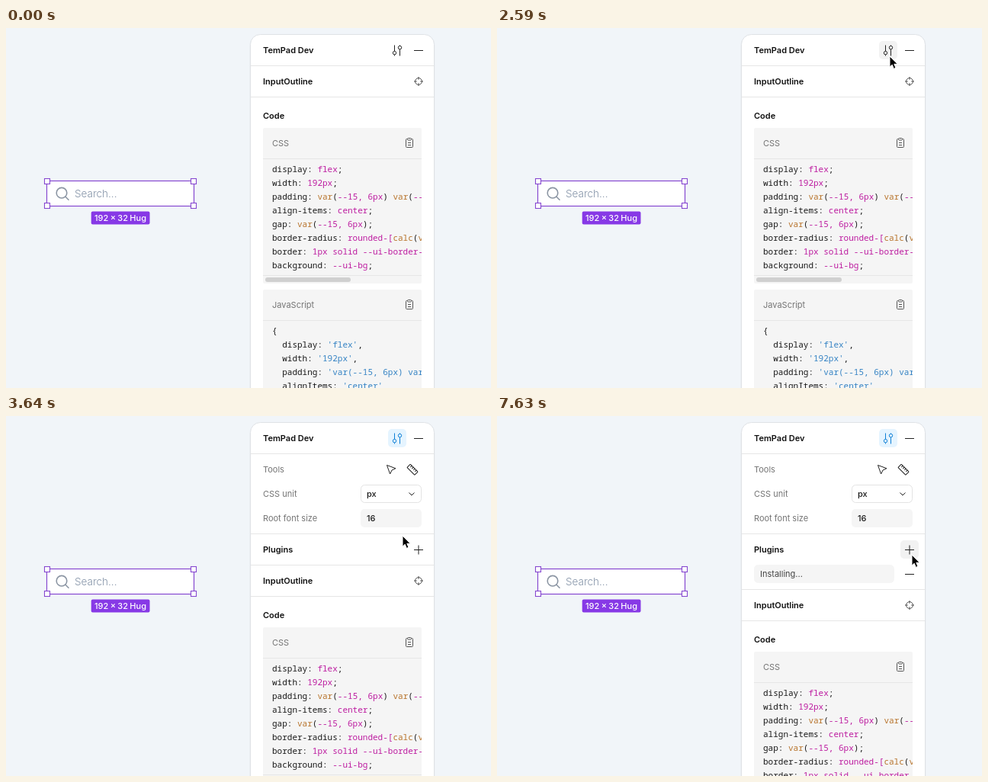
Write an HTML page that moves like this. It is 636 px wide and 472 px high and loops after 8 s.

```html
<!DOCTYPE html>
<html lang="en">
<head>
<meta charset="utf-8">
<style>
  html, body { margin: 0; width: 100%; height: 100%; overflow: hidden; background: #f1f5f9; }
  svg { display: block; }
  text { font: 11px Inter, sans-serif; fill: #1a1a1a; white-space: pre; }
  .bold { font-weight: 600; fill: #111; }
  .mid { font-weight: 500; }
  .dim { fill: #757575; }
  .code { font-family: "Noto Sans Mono", monospace; }
  .val { fill: #bd1ca0; }
  .fn { fill: #b8742c; }
  .str { fill: #3583c4; }
  .icon { fill: none; stroke: #222; }
  .soft { stroke: #555; }
  .rule { stroke: #e6e6e6; }
  .box { fill: #f5f5f5; }
</style>
</head>
<body>
<svg width="636" height="472" viewBox="0 0 636 472">
  <defs>
    <clipPath id="codeClip"><rect x="337" y="120" width="208" height="500"/></clipPath>
    <clipPath id="foldClip"><rect id="fold" x="321" y="50" width="240" height="0"/></clipPath>
    <g id="clipboard" class="icon soft">
      <path d="M526.5 145.5h-1a1 1 0 0 0-1 1v9a1 1 0 0 0 1 1h7a1 1 0 0 0 1-1v-9a1 1 0 0 0-1-1h-1M527 150.5h4M527 153.5h4"/>
      <rect x="526.5" y="144.5" width="5" height="2.5" rx="1"/>
    </g>
  </defs>

  <rect x="53.5" y="200.5" width="193" height="33" fill="#fff" stroke="#8648d0" stroke-width="1.2"/>
  <g id="handles" fill="#fff" stroke="#8648d0" stroke-width="1.1"></g>
  <g fill="none" stroke="#8b95a3" stroke-width="1.6" stroke-linecap="round">
    <circle cx="73" cy="216.2" r="6.8"/><path d="M78 221.2l4 4"/>
  </g>
  <text x="90" y="222" style="font-size:13.5px;font-weight:300;fill:#8594a8">Search...</text>
  <rect x="111.7" y="240.4" width="76.8" height="17.2" rx="2" fill="#8739e6"/>
  <text x="150" y="253" text-anchor="middle" class="mid" style="fill:#fff;word-spacing:-.6px">192 × 32 Hug</text>

  <rect x="319.5" y="9" width="243" height="500" rx="14" fill="#000" opacity=".03"/>
  <rect x="320.5" y="8.5" width="241" height="500" rx="13" fill="#fff" stroke="#dfe2e6"/>
  <text x="337" y="33" class="bold">TemPad Dev</text>
  <rect id="prefBg" x="501" y="17" width="24" height="24" rx="5"/>
  <g id="pref" class="icon">
    <path d="M509.5 22.5v8M509.5 35v1.5M516.5 22.5v1M516.5 28v8.5"/>
    <circle cx="509.5" cy="32.7" r="2.2"/><circle cx="516.5" cy="25.7" r="2.2"/>
  </g>
  <path class="icon" d="M535 29.5h12"/>
  <path class="rule" d="M321 49.5h240"/>

  <g clip-path="url(#foldClip)">
    <g id="prefs">
      <text x="337" y="74" class="dim">Tools</text>
      <path class="icon" stroke-linejoin="round" d="M499.5 64.5l11.5 4.2-5 2.3-2.4 5z"/>
      <g class="icon" transform="translate(533 70.3) rotate(45)">
        <rect x="-7" y="-3" width="14" height="6" rx=".6"/>
        <path d="M-4.2-3v2.6M-1.4-3v2.6M1.4-3v2.6M4.2-3v2.6"/>
      </g>
      <text x="337" y="106" class="dim">CSS unit</text>
      <rect x="465.5" y="90.5" width="79" height="23" rx="5" fill="#fff" stroke="#e3e3e3"/>
      <text x="473" y="106" class="mid">px</text>
      <path class="icon" d="M528.5 100.5l3.5 3.5 3.5-3.5"/>
      <text x="337" y="138" class="dim">Root font size</text>
      <rect x="465" y="122" width="80" height="24" rx="5" class="box"/>
      <text x="473" y="138" class="mid">16</text>
      <path class="rule" d="M321 154.5h240"/>
      <text x="337" y="179" class="bold">Plugins</text>
      <rect id="addBg" x="529" y="163" width="24" height="24" rx="5" fill="#f2f2f2"/>
      <path class="icon" d="M535 175.5h12M541 169.5v12"/>
      <g id="plugin">
        <rect id="field" x="337.5" y="195.5" width="183" height="23" rx="5" class="box"/>
        <text id="entry" x="345" y="211"></text>
        <path id="caret" class="icon" d="M0 201v13"/>
        <path class="icon" d="M535 207.5h12"/>
      </g>
    </g>
    <path id="foldRule" class="rule" d="M321 49.5h240"/>
  </g>

  <g id="body">
    <text x="337" y="74" class="bold">InputOutline</text>
    <g class="icon soft">
      <circle cx="541" cy="70" r="4.4"/>
      <path d="M541 64v3.8M541 72.2V76M535 70h3.8M543.2 70h3.8"/>
    </g>
    <path class="rule" d="M321 90.5h240"/>
    <text x="337" y="119" class="bold">Code</text>
    <g clip-path="url(#codeClip)">
      <rect x="337" y="131" width="208" height="204" rx="2" class="box"/>
      <text x="349" y="155" class="dim">CSS</text>
      <use href="#clipboard"/>
      <path class="rule" d="M337 171.5h208M337 324.5h208"/>
      <g id="css"></g>
      <rect x="340" y="327" width="112" height="6" rx="3" fill="#d0d0d0"/>
      <rect x="337" y="343" width="208" height="200" rx="2" class="box"/>
      <text x="349" y="367" class="dim">JavaScript</text>
      <use href="#clipboard" y="212"/>
      <path class="rule" d="M337 383.5h208"/>
      <g id="js"></g>
    </g>
  </g>

  <path id="cursor" d="M0 0V14.2L3.2 11.2 5.4 16.4 8 15.3 5.8 10.3H10.2Z" stroke="#fff" stroke-linejoin="round"/>
</svg>
<script>
const $ = id => document.getElementById(id);
const show = (id, on) => $(id).setAttribute('visibility', on ? 'visible' : 'hidden');
const move = (id, x, y) => $(id).setAttribute('transform', `translate(${x} ${y})`);
const span = (cls, s) => `<tspan class="${cls}">${s}</tspan>`;

const css = `display: flex
width: 192px
padding: var(--15, 6px) var(--25, 10px)
align-items: center
gap: var(--15, 6px)
border-radius: rounded-[calc(var(--ui-radius)*1.5)]
border: 1px solid --ui-border-accented
background: --ui-bg`;
const js = `{
  display: 'flex',
  width: '192px',
  padding: 'var(--15, 6px) var(--25, 10px)',
  alignItems: 'center',`;

function cssLine(line) {
  const [prop, value] = line.split(': ');
  const parts = value.split(/(var|calc|[()])/).map(s =>
    /^(var|calc)$/.test(s) ? span('fn', s) : /^[()]$/.test(s) ? s : span('val', s));
  return `${prop}: ${parts.join('')};`;
}
const jsLine = line => line.replace(/'.*'/, s => span('str', s));
const list = (src, y, paint) => src.split('\n').map((line, i) =>
  `<text class="code" x="349" y="${y + 18 * i}">${paint(line)}</text>`).join('');

$('css').innerHTML = list(css, 189, cssLine);
$('js').innerHTML = list(js, 401, jsLine);
$('handles').innerHTML = [54, 246].flatMap(x => [201, 233].map(y =>
  `<rect x="${x - 3.5}" y="${y - 3.5}" width="7" height="7"/>`)).join('');

// time, x, y of the pointer tip
const path = [
  [1400, 608, 234], [1470, 585, 170], [1540, 556, 95], [1610, 537, 62], [1680, 530, 54],
  [1750, 530, 54], [1890, 522, 51], [2100, 522, 51], [2450, 515, 37], [3150, 515, 37],
  [3640, 520, 157], [3850, 543, 184], [3990, 544, 180], [7000, 544, 180], [7001, 544, 182], [8000, 544, 182]
];
const smooth = p => p * p * (3 - 2 * p);
const clamp = p => Math.max(0, Math.min(1, p));

function pointer(t) {
  const i = Math.max(1, path.findIndex(k => k[0] >= t));
  const [t0, x0, y0] = path[i - 1], [t1, x1, y1] = path[i];
  const p = smooth(clamp((t - t0) / (t1 - t0)));
  return [x0 + (x1 - x0) * p, y0 + (y1 - y0) * p];
}

const OPEN = 2693, OPEN_TIME = 177, ADD = 4060, ENTER = 6580;
const keys = [4760, 5180, 5390, 5740, 6090];

function draw(t) {
  const [x, y] = pointer(t);
  const inside = (l, top) => t >= 1400 && x >= l && x <= l + 24 && y >= top && y <= top + 24;
  move('cursor', x, y);
  show('cursor', t >= 1400 && (t < keys[0] || t >= 7560));

  const open = smooth(clamp((t - OPEN) / OPEN_TIME));
  const active = t >= OPEN, added = t >= ADD;
  const shift = added ? 178 : Math.round(146 * open);
  $('fold').setAttribute('height', shift);
  move('foldRule', 0, shift);
  move('body', 0, shift);
  move('prefs', 0, -8 * (1 - open));

  $('pref').style.stroke = active ? '#0d7fd6' : '#222';
  $('prefBg').style.fill = active ? (open < 0.5 ? '#f2f9fd' : '#e5f4ff')
    : inside(501, 17) ? '#f2f2f2' : 'none';
  show('addBg', inside(529, 163));

  const typing = added && t < ENTER;
  show('plugin', added);
  $('field').style.stroke = typing ? '#2f8fdd' : '#f5f5f5';
  const typed = '@nuxt'.slice(0, keys.filter(k => t >= k).length);
  $('entry').textContent = typing ? typed : 'Installing...';
  $('entry').style.fill = typing ? '#1a1a1a' : '#444';
  show('caret', typing);
  move('caret', 345.5 + (typing && typed ? $('entry').getComputedTextLength() : 0), 0);
}

function tick(now) {
  draw(Math.floor(now % 8000 / 70) * 70);
  requestAnimationFrame(tick);
}
draw(0);
requestAnimationFrame(tick);
</script>
</body>
</html>
```
